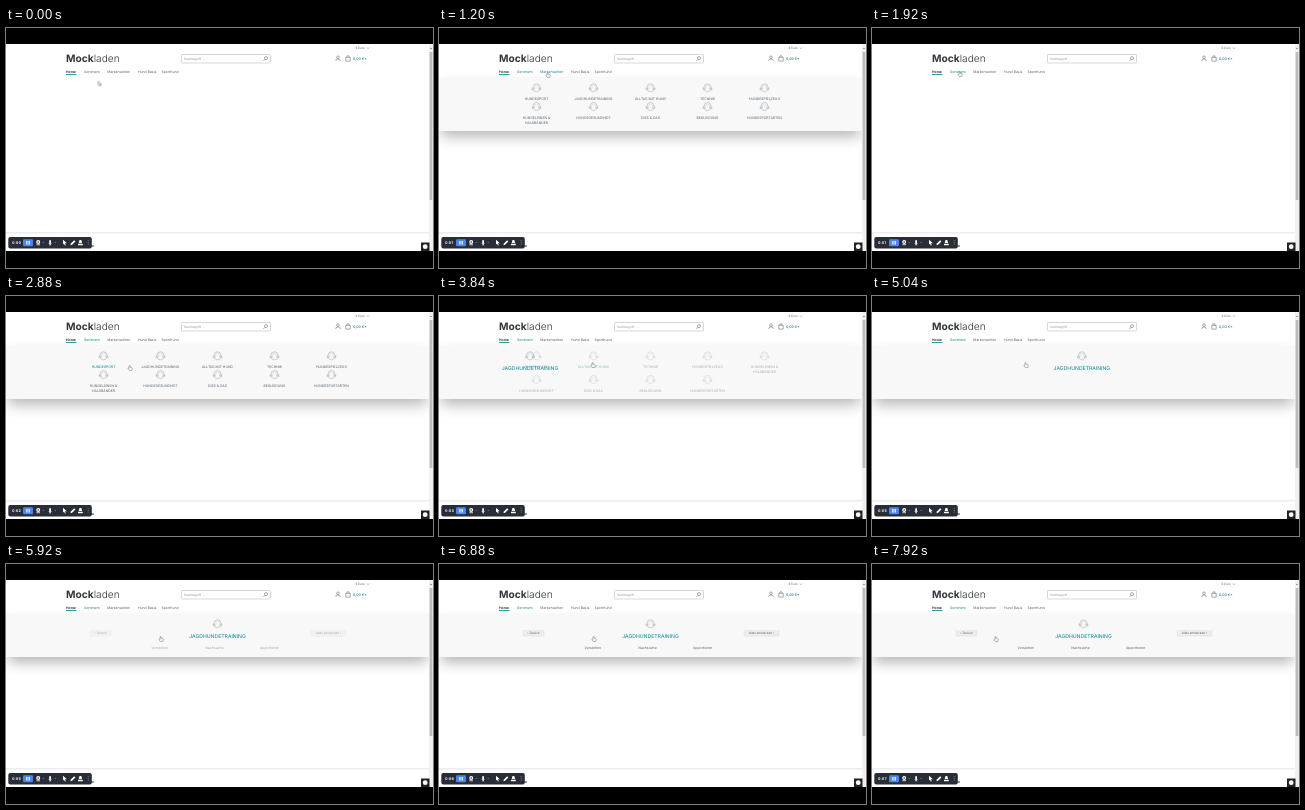
An HTML page for the animation above (8000 ms loop, 427 px wide and 240 px high).

```html
<!DOCTYPE html>
<html lang="de">
<head>
<meta charset="utf-8">
<title>Shop-Menü</title>
<style>
  html, body { margin: 0; width: 100%; height: 100%; overflow: hidden; background: #000; }
  #stage { position: absolute; left: 0; top: 0; width: 427px; height: 240px; overflow: hidden; background: #fff; }
  svg { position: absolute; left: 0; top: 0; }
  text { font-family: Inter, Roboto, sans-serif; font-size: 3.45px; fill: #59626a; text-rendering: geometricPrecision; }
  .mid { text-anchor: middle; }
  .line { fill: none; stroke: #6b737a; stroke-width: .6; }
  .tool { fill: #fff; }
  .teal { fill: #008490; }

  .anim { animation: 8s step-end infinite; }
  #panel {
    position: absolute; left: 0; top: 50px; width: 423px; height: 53px;
    background: #f8f8f8; box-shadow: 0 7px 14px -2px rgba(0, 0, 0, .31);
    animation-name: open, shrink;
  }
  #menu { animation-name: open; }
  #sortiment { animation-name: sortiment; }
  #marken { animation-name: marken; }
  #first { animation-name: before; }
  #first .i0 { animation: sport 8s step-end infinite; }
  #first .i1 { animation: training 8s step-end infinite; }
  #rest { animation-name: rest; animation-timing-function: linear; }
  #rest .i1 { fill: #008490; }
  #picked { animation-name: appear, slide; }
  #picked text { fill: #008490; font-size: 5.15px; animation-name: grow; animation-timing-function: linear; }
  #details { animation-name: details; animation-timing-function: cubic-bezier(.37, 0, .63, 1); }
  #cursor { animation-name: travel; animation-timing-function: ease-in-out; }
  #arrow { animation-name: arrow; }
  #hand { animation-name: hand; }
  #digits { animation: count 8s steps(8) infinite; }

  @keyframes open { 0% { opacity: 0 } 5% { opacity: 1 } 17% { opacity: 0 } 24.5%, 100% { opacity: 1 } }
  @keyframes shrink { 0% { height: 53px } 63.8%, 100% { height: 43px } }
  @keyframes sortiment { 0% { fill: #59626a } 4% { fill: #008490 } 17% { fill: #59626a } 23.5%, 100% { fill: #008490 } }
  @keyframes marken { 0% { fill: #59626a } 14% { fill: #008490 } 22.8%, 100% { fill: #59626a } }
  @keyframes sport { 0% { fill: #59626a } 34% { fill: #008490 } 38%, 100% { fill: #59626a } }
  @keyframes training { 0% { fill: #59626a } 38.5%, 100% { fill: #008490 } }
  @keyframes before { 0% { opacity: 1 } 43%, 100% { opacity: 0 } }
  @keyframes rest { 0%, 42.99% { opacity: 0 } 43% { opacity: 1 } 53%, 100% { opacity: 0 } }
  @keyframes appear { 0% { opacity: 0 } 43%, 100% { opacity: 1 } }
  @keyframes slide {
    0% { transform: translateX(91px) }
    53.75% { transform: translateX(91px); animation-timing-function: cubic-bezier(.37, 0, .63, 1) }
    63.75%, 100% { transform: translateX(211.5px) }
  }
  @keyframes grow { 0%, 43% { font-size: 3.45px } 46%, 100% { font-size: 5.15px } }
  @keyframes details { 0%, 68.75% { opacity: 0 } 78.75%, 100% { opacity: 1 } }
  @keyframes arrow { 0% { opacity: 1 } 3.5%, 100% { opacity: 0 } }
  @keyframes hand { 0% { opacity: 0 } 3.5%, 100% { opacity: 1 } }
  @keyframes travel {
    0%, .5% { transform: translate(93.5px, 55.5px) }
    4%, 9% { transform: translate(88px, 45.5px) }
    14.5%, 22% { transform: translate(109px, 47px) }
    24%, 32% { transform: translate(88px, 46px) }
    34% { transform: translate(101px, 66px) }
    36% { transform: translate(124px, 72px) }
    40%, 65% { transform: translate(154px, 69px) }
    69%, 87% { transform: translate(155px, 75px) }
    96%, 100% { transform: translate(124px, 75px) }
  }
  @keyframes count { to { transform: translateY(-48px) } }
</style>
</head>
<body>
<div id="stage">
  <svg width="427" height="240">
    <defs>
      <g id="headset" fill="none" stroke="#b5b9bc" stroke-width=".7">
        <path d="M-3.4 1V-.6a3.4 3.6 0 0 1 6.8 0V1M-2.2 3.2q2.2 1.4 4.4 0" />
        <path d="M-2 .6v-1a2 2.2 0 0 1 4 0v1" stroke="#d6d9db" />
        <path d="M-4.2-.4v2.6M4.2-.4v2.6M-2.7.4v2.4M2.7.4v2.4" stroke="#a4a8ac" />
      </g>
    </defs>

    <text x="349.5" y="21.3" font-size="3" style="font-size:3px">€ Euro</text>
    <path d="M361 19.6l1 1 1-1" class="line" stroke-width=".4" />
    <text x="60" y="34" style="font-size:10.2px;fill:#30363b"><tspan font-weight="700">Mock</tspan><tspan font-weight="300">laden</tspan></text>
    <rect x="175.5" y="26.5" width="89" height="8.5" rx=".6" fill="#fff" stroke="#c3c7cb" stroke-width=".7" />
    <text x="178" y="31.8" style="font-size:3.1px;fill:#8b9399">Suchbegriff ...</text>
    <g class="line">
      <circle cx="260" cy="30.1" r="1.5" /><path d="M258.9 31.3l-1.5 1.6" />
      <circle cx="332" cy="29.2" r="1.3" /><path d="M329.8 33v-.6q0-1.3 1.4-1.3h1.6q1.4 0 1.4 1.3v.6" />
      <path d="M339.8 29.3h4.4v3.8h-4.4zM340.8 29.3q0-1.8 1.2-1.8t1.2 1.8" />
    </g>
    <text x="347" y="32" class="teal" font-weight="600" style="font-size:3.55px;fill:#23858f">0,00 €*</text>

    <text x="60" y="44.8" font-weight="700" style="fill:#30363b">Home</text>
    <rect x="60" y="46.2" width="10.4" height=".8" class="teal" />
    <text x="78" y="44.8" id="sortiment" class="anim">Sortiment</text>
    <text x="101.3" y="44.8" id="marken" class="anim">Markenwelten</text>
    <text x="132" y="44.8">Hund Basis</text>
    <text x="155.5" y="44.8">Sporthund</text>

    <rect y="204.5" width="423" height=".8" fill="#d9dcdf" />
    <text x="84" y="219" font-weight="700" style="fill:#30363b">ce</text>
  </svg>

  <div id="panel" class="anim"></div>

  <svg width="427" height="240">
    <g id="menu" class="anim">
      <g id="first" class="anim"></g>
      <g id="rest" class="anim"></g>
      <g id="picked" class="anim">
        <use href="#headset" y="60" />
        <text y="73.6" class="mid anim">JAGDHUNDETRAINING</text>
      </g>
      <g id="details" class="anim">
        <g fill="#ededed" stroke="#dcdcdc" stroke-width=".4">
          <rect x="84" y="66.2" width="21" height="6" rx=".5" />
          <rect x="305" y="66.2" width="35" height="6" rx=".5" />
        </g>
        <text x="94.5" y="70.3" class="mid" style="font-size:3.1px">‹ Zurück</text>
        <text x="322.5" y="70.3" class="mid" style="font-size:3.1px">Alles entdecken ›</text>
        <text x="145.5" y="85.3">Vorstehen</text>
        <text x="199.3" y="85.3">Nachsuche</text>
        <text x="254" y="85.3">Apportieren</text>
      </g>
    </g>

    <rect x="423" y="16" width="4" height="207" fill="#f1f1f1" />
    <path d="M424 21l1-1.5 1 1.5z" fill="#777" />
    <rect x="423.6" y="24" width="2.8" height="148" fill="#bdbdbd" />

    <rect x="415" y="214.5" width="8.5" height="8.5" fill="#222" />
    <circle cx="419.2" cy="218.7" r="2.4" fill="#fff" />

    <rect x="2.3" y="209" width="83.5" height="11.5" rx="2" fill="#292d38" />
    <text x="6" y="216" class="tool" font-weight="700" style="font-size:3.7px;fill:#fff">0:0</text>
    <svg x="12" y="211" width="4" height="6" overflow="hidden"><g id="digits"></g></svg>
    <rect x="17" y="211.2" width="10" height="7" rx="1.3" fill="#4d86ee" />
    <path d="M20.3 213h1.2v3.4h-1.2zM22.6 213h1.2v3.4h-1.2z" class="tool" />
    <g class="tool">
      <circle cx="32.2" cy="214" r="2" /><path d="M30.4 216.4h3.6v.8h-3.6z" />
      <rect x="43.2" y="212" width="1.8" height="3.4" rx=".9" /><path d="M42.3 215.2h3.6l-1.3 1.2v1h-1v-1z" />
      <path d="M57 211.8l3.8 3.4h-1.9l.9 2-.9.4-.9-2-1 1z" />
      <path d="M64.4 217.2l.5-1.7 3.3-3.3 1.2 1.2-3.3 3.3z" />
      <path d="M73.5 212h1.8l.8 3h-3.4zM72 215.7h4.8v1.5H72z" />
      <path d="M81.8 212.3h.8v.8h-.8zM81.8 214h.8v.8h-.8zM81.8 215.7h.8v.8h-.8z" opacity=".6" />
    </g>
    <circle cx="32.2" cy="214" r=".8" fill="#292d38" />
    <path d="M36.6 214l.8.8.8-.8M48.4 214l.8.8.8-.8" fill="none" stroke="#aab" stroke-width=".5" />

    <g id="cursor" class="anim" fill="#fff" stroke="#555" stroke-width=".45" stroke-linejoin="round">
      <path id="arrow" class="anim" d="M-1.2-2.4v4.2l1-.9.7 1.6.8-.4-.7-1.5h1.4z" />
      <path id="hand" class="anim" d="M-.9.4v-2.6q.5-.6 1 0v1.4l1.7.5q.5.2.4.8l-.4 1.9h-2.5l-1.4-1.9q.3-.8 1.2-.1z" />
    </g>
    <path d="M0 0h427v16H0zM0 223h427v17H0z" />
  </svg>
</div>
<script>
  const labels = ['HUNDESPORT', 'JAGDHUNDETRAINING', 'ALLTAG MIT HUND', 'TECHNIK', 'HUNDESPIELZEUG',
    'HUNDELEINEN &amp;|HALSBÄNDER', 'HUNDEGESUNDHEIT', 'DIES &amp; DAS', 'BEKLEIDUNG', 'HUNDESPORTARTEN'];

  const grid = (names, rowHeight) => names.map((name, i) => {
    const x = 97.5 + (i % 5) * 57;
    const y = 60 + Math.floor(i / 5) * rowHeight;
    const lines = name.split('|').map((line, n) =>
      `<text class="mid i${i}" x="${x}" y="${y + 11.9 + n * 5}">${line}</text>`);
    return `<use href="#headset" x="${x}" y="${y}"/>${lines.join('')}`;
  }).join('');

  const fill = (id, markup) => { document.getElementById(id).innerHTML = markup; };
  fill('first', grid(labels, 18.7));
  fill('rest', grid(labels.filter((_, i) => i !== 1), 23.6));
  fill('digits', [...Array(8).keys()].map(n =>
    `<text x=".4" y="${5 + n * 6}" font-weight="700" style="font-size:3.7px;fill:#fff">${n}</text>`).join(''));
</script>
</body>
</html>
```
